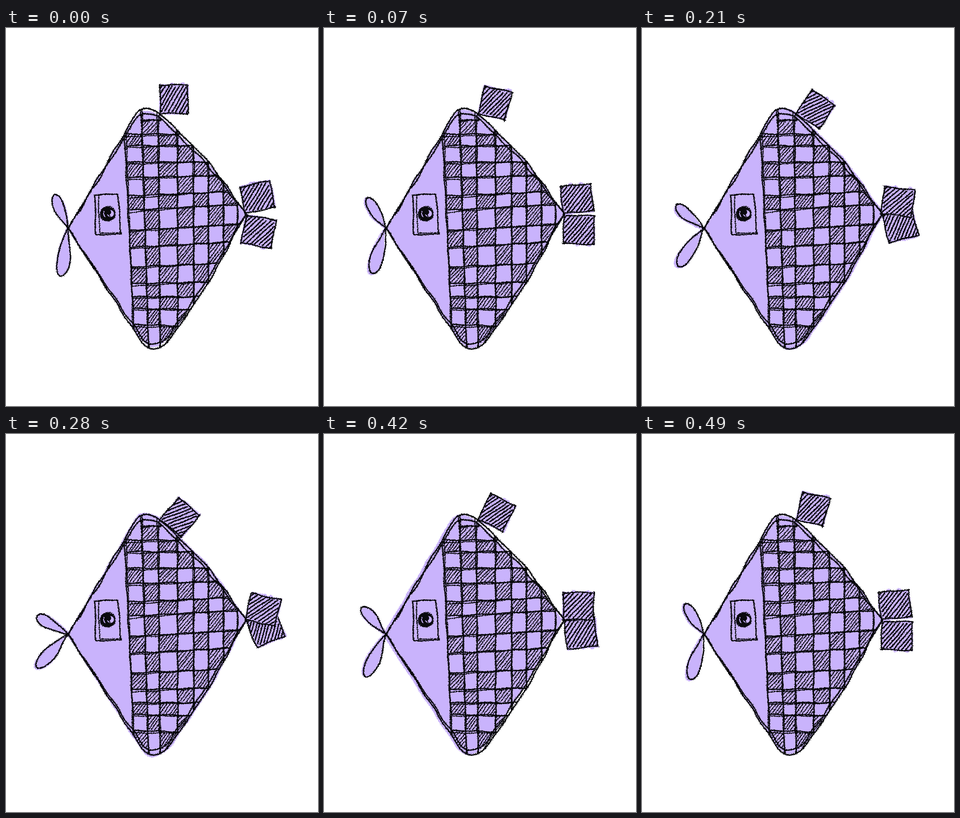
These frames come from a looping animation (678 by 823 pixels, 0.56 s). An HTML page with a canvas:

```html
<!DOCTYPE html>
<html lang="en">
<head>
<meta charset="utf-8">
<title>Checkered fish</title>
<style>
html, body { margin: 0; width: 100%; height: 100%; overflow: hidden; background: #fff; }
canvas { display: block; }
</style>
</head>
<body>
<canvas id="stage" width="678" height="823"></canvas>
<script>
const W = 678, H = 823, STEP = 70;
const INK = '#0a0a0e', LILAC = '#c9b3fc';
const MOUTH = [134, 436], TAIL = [520, 404], DORSAL = [335, 186];

let seed = 7;
function rnd() {
  seed = (seed * 1664525 + 1013904223) >>> 0;
  return seed / 4294967296;
}
const spread = n => (rnd() - 0.5) * 2 * n;
const rad = deg => deg * Math.PI / 180;
const mix = (a, b, t) => [a[0] + (b[0] - a[0]) * t, a[1] + (b[1] - a[1]) * t];
const close = pts => [...pts, pts[0]];

function layer() {
  const c = document.createElement('canvas');
  c.width = W;
  c.height = H;
  return c;
}

// Grainy stroke made of small square specks.
function crayon(g, pts, w, color = INK, wobble = 0.8) {
  g.fillStyle = color;
  const core = Math.max(1, Math.round(w - 1));
  const phase = rnd() * 9;
  let run = 0;
  for (let i = 1; i < pts.length; i++) {
    const len = Math.hypot(pts[i][0] - pts[i - 1][0], pts[i][1] - pts[i - 1][1]);
    for (let s = 0; s < len; s += 0.8) {
      const p = mix(pts[i - 1], pts[i], s / len), u = run + s;
      const x = p[0] + Math.sin(u / 13 + phase) * wobble;
      const y = p[1] + Math.sin(u / 10 + phase * 2) * wobble;
      if (rnd() < 0.92) g.fillRect(Math.round(x - core / 2), Math.round(y - core / 2), core, core);
      for (let k = 0; k < 2; k++) {
        g.fillRect(Math.round(x - 0.5 + spread(w * 0.68)), Math.round(y - 0.5 + spread(w * 0.68)), 1, 1);
      }
    }
    run += len;
  }
}

function trace(g, pts) {
  g.beginPath();
  pts.forEach(p => g.lineTo(p[0], p[1]));
  g.closePath();
}

function fillShape(g, pts, dx = 0, dy = 0) {
  const moved = pts.map(p => [p[0] + dx, p[1] + dy]);
  g.fillStyle = LILAC;
  trace(g, moved);
  g.fill();
  crayon(g, close(moved), 3, LILAC);
}

const ring = (x, y, r) => Array.from({ length: 24 },
  (_, i) => [x + r * Math.cos(i * Math.PI / 12), y + r * Math.sin(i * Math.PI / 12)]);

// Parallel strokes inside a convex polygon.
function hatch(g, poly, deg, gap, w) {
  const dx = Math.cos(rad(deg)), dy = -Math.sin(rad(deg));
  const d = poly.map(p => p[1] * dx - p[0] * dy);
  const max = Math.max(...d);
  for (let v = Math.min(...d) + gap * 0.6; v < max; v += gap + spread(0.7)) {
    const hits = [];
    poly.forEach((p, i) => {
      const j = (i + 1) % poly.length;
      if ((d[i] - v) * (d[j] - v) < 0) hits.push(mix(p, poly[j], (v - d[i]) / (d[j] - d[i])));
    });
    if (hits.length < 2) continue;
    const [a, b] = hits;
    if (Math.hypot(a[0] - b[0], a[1] - b[1]) > 5) {
      crayon(g, [mix(a, b, 0.03 + rnd() * 0.05), mix(a, b, 0.92 + rnd() * 0.05)], w, INK, 0.5);
    }
  }
}

// Polygon whose corners [x, y, r] are rounded off.
function rounded(corners) {
  const n = corners.length;
  return corners.flatMap((c, i) => {
    const r = c[2];
    if (!r) return [c];
    const [a, b] = [corners[(i + n - 1) % n], corners[(i + 1) % n]]
      .map(o => mix(c, o, Math.min(0.5, r / Math.hypot(o[0] - c[0], o[1] - c[1]))));
    return Array.from({ length: 9 }, (_, k) => mix(mix(a, c, k / 8), mix(c, b, k / 8), k / 8));
  });
}

// Body outline, pulled toward its middle by a scale; the two tips stay.
function bodyShape(scale) {
  return rounded([
    [135, 437, 0], [290, 174, 17], [328, 179, 17], [442, 292, 25], [521, 404, 0],
    [446, 546, 40], [354, 682, 20], [320, 704, 18], [297, 688, 18]
  ].map(([x, y, r]) => r ? [320 + (x - 320) * scale, 430 + (y - 430) * scale, r] : [x, y, r]));
}
const outline = bodyShape(1);

// Woven grid: columns lean near the face, rows tilt in the middle.
const colX = [267, 302, 333, 373, 408, 440, 473, 503];
const rowY = [201, 231, 256, 292, 325, 364, 395, 439, 476, 519, 556, 585, 611, 646, 684];
const xAt = (c, y) => colX[c] + (y - 430) * 0.05 * Math.max(0, 1 - c * 0.45);
const yAt = (r, x) => rowY[r] - (x - 300) * 0.055 * Math.sin(Math.PI * Math.max(0, r - 3) / 8);
const knot = (c, r) => {
  const y = yAt(r, colX[c]);
  return [xAt(c, y), y];
};

function drawWeave(g) {
  g.save();
  trace(g, outline);
  g.clip();
  for (let r = 0; r < rowY.length - 1; r++) {
    for (let c = 0; c < colX.length - 1; c++) {
      if ((r + c) % 2 === 0) continue;
      hatch(g, [knot(c, r), knot(c + 1, r), knot(c + 1, r + 1), knot(c, r + 1)], 51 + spread(5), 5.7, 2.1);
    }
  }
  // Every thread is drawn twice, the second time slightly off.
  for (let r = 0; r < rowY.length - 1; r++) {
    const x = Math.max(xAt(0, rowY[r]), r ? 0 : 292), gap = 3 + rnd() * 3;
    const end = r ? 521 : 338;
    crayon(g, [[x, yAt(r, x)], [end, yAt(r, end)]], 2.7);
    crayon(g, [[x, yAt(r, x) + gap], [end, yAt(r, end) - gap * 0.6]], 2.2);
  }
  for (let c = 0; c < colX.length; c++) {
    const gap = c ? 2 + rnd() * 2 : -6;
    crayon(g, [[xAt(c, 175), 175], [xAt(c, 705), 705]], 2.8);
    crayon(g, [[xAt(c, 175) - gap * 0.8, 175], [xAt(c, 705) + gap * 0.5, 705]], 2.3);
  }
  g.restore();
}

function drawEye(g) {
  const disc = (x, y, r, color) => {
    g.fillStyle = color;
    trace(g, ring(x, y, r));
    g.fill();
  };
  crayon(g, close([[193, 364], [243, 361], [250, 449], [195, 450]]), 2.7);
  crayon(g, [[201, 364], [203, 446], [249, 446]], 2.2);
  disc(221, 405, 15.5, INK);
  crayon(g, close(ring(221, 405, 15.5)), 2.4);
  disc(227, 404, 7.5, LILAC);
  disc(223, 401, 5.5, INK);
  crayon(g, [[222, 398], [222, 404], [226, 410]], 2);
  crayon(g, [[213, 399], [212, 405], [215, 411]], 1.2, LILAC, 0.2);
}

function drawBody(g) {
  drawWeave(g);
  crayon(g, close(outline), 3, INK, 1);
  crayon(g, close(bodyShape(0.963)), 2.8, INK, 1.4);
  drawEye(g);
}

// Teardrop lip from the mouth; deg runs clockwise from the x axis.
function lip(deg, len, wide) {
  const c = Math.cos(rad(deg)), s = Math.sin(rad(deg));
  return Array.from({ length: 41 }, (_, i) => {
    const u = i / 20 - 1, t = Math.cos(u * Math.PI / 2);
    const w = Math.sign(u) * wide * Math.sin(Math.PI * t / 1.7) * Math.sqrt(Math.max(0, 1 - t ** 6));
    return mix(MOUTH, [MOUTH[0] + len * c, MOUTH[1] + len * s], t)
      .map((v, j) => v + w * (j ? c : -s));
  }).reverse();
}

// Square fin hinged at one corner and turned clockwise.
function drawFin(g, [x, y], turn, w, h, hatchDeg) {
  const c = Math.cos(rad(turn)), s = Math.sin(rad(turn));
  const at = (u, v) => [x + u * c + v * s, y + u * s - v * c];
  const quad = [at(0, h), at(w, h), at(w, 0), at(0, 0)];
  fillShape(g, quad, spread(2), spread(2));
  for (let k = 0; k < 2; k++) fillShape(g, ring(...mix(quad[0], quad[1], 0.3 + rnd() * 0.6), 3 + rnd() * 2));
  hatch(g, quad, hatchDeg - turn, 6.8, 2.6);
  quad.forEach((p, k) => crayon(g, [p, mix(p, quad[(k + 1) % 4], 1.03)], 2.9, INK, 1));
}

// k runs from 0 (mouth open) to 4 (mouth stretched forward).
function drawPose(k, body) {
  seed = 101 + k * 37;
  const c = layer(), g = c.getContext('2d');
  g.fillStyle = '#fff';
  g.fillRect(0, 0, W, H);

  fillShape(g, bodyShape(0.975 + k * 0.009), [0, 0, -6, 3, 0][k]);
  drawFin(g, DORSAL, 15.5 * k - 1.4 * k * k, 60, 62, 60);
  drawFin(g, [TAIL[0] + 2, TAIL[1] + 3], 10 - 8 * k, 66, -62, 52);
  drawFin(g, TAIL, 6.2 * k - 12, 66, 59, 47);

  const lips = [lip(-112 - 9.4 * k, 78, 13), lip(97.5 + 8.8 * k, 105 - 1.8 * k, 15.5)];
  lips.forEach(p => fillShape(g, p, spread(3), spread(3)));
  g.drawImage(body, 0, 0);
  lips.forEach(p => crayon(g, p, 3));
  return c;
}

const body = layer();
drawBody(body.getContext('2d'));
const poses = Array.from({ length: 5 }, (_, k) => drawPose(k, body));
const stage = document.getElementById('stage').getContext('2d');

function tick() {
  const step = Math.floor(performance.now() / STEP) % 8;
  stage.drawImage(poses[4 - Math.abs(4 - step)], 0, 0);
  requestAnimationFrame(tick);
}
tick();
</script>
</body>
</html>
```
